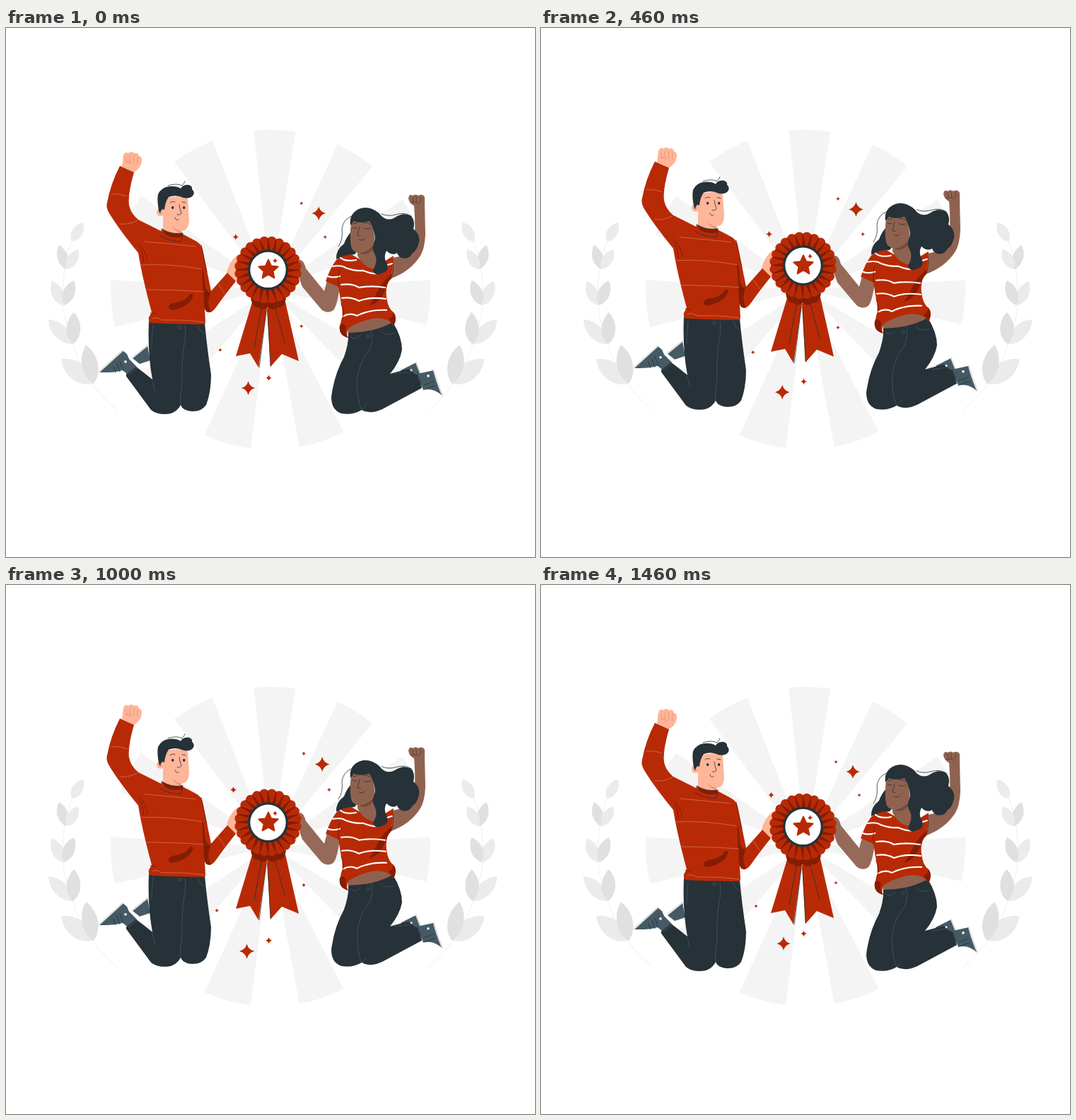
These frames come from a looping animation (748x748 px, 1500 ms). An HTML page:

```html
<!DOCTYPE html>
<html lang="en">
<head>
<meta charset="utf-8">
<title>Award jump</title>
<style>
html, body { margin: 0; width: 100%; height: 100%; overflow: hidden; background: #fff; }
svg { display: block; width: 100%; height: 100%; }
.red { fill: #b82a06; } .deep { fill: #851d04; } .navy { fill: #263238; } .shoe { fill: #455a64; }
.skin { fill: #ffb598; } .brown { fill: #8f6250; } .tan { fill: #966a58; }
.line { fill: none; stroke-width: .8; stroke-linecap: round; stroke-linejoin: round; }
.ink { stroke: #263238; } .seam { stroke: #46575f; } .thread { stroke: #d97b5f; stroke-width: .7; }
.wave { stroke: #fff; stroke-width: 2.1; } .sole { stroke: #dfe1e2; stroke-width: 2.2; }
</style>
</head>
<body>
<svg viewBox="0 0 748 748">
  <defs>
    <g id="laurel">
      <path class="line" stroke="#ebebeb" d="M158 541Q108 499 94 445Q78 405 80 372Q82 326 94 300"/>
    </g>
  </defs>
  <path id="rays" fill="#f4f4f4"/>
  <use href="#laurel"/>
  <use href="#laurel" transform="matrix(-1 0 0 1 754.5 0)"/>

  <g id="jump">
    <g id="man">
      <path class="shoe" d="M179 467L200 449L204 470L189 475Z"/>
      <path class="line sole" d="M179 466L200 449"/>
      <path class="shoe" d="M132 487L165 456L171 461L174 468L185 479L171 489L165 484Q150 488 132 487Z"/>
      <path class="line sole" d="M132 486L165 456"/>
      <path class="line ink" d="M157 474L161 486M161 471L166 484M152 479L155 487"/>
      <circle cx="169" cy="472" r="1.8" fill="#fff"/>
      <path class="navy" d="M202 415L281 417Q284 450 290 490Q290 515 283 533Q276 543 262 542Q250 541 247 533Q240 546 225 546Q212 546 205 540L171 494Q168 490 172 488L184 479Q196 488 207 497Q200 460 202 415Z"/>
      <path class="line seam" d="M247 533Q246 525 247 518M253 421Q255 437 252 447Q248 470 249 500L247 519M207 500L211 514M208 420Q206 440 206 452M272 421Q274 430 280 432M173 490L186 481"/>
      <circle class="line seam" cx="245" cy="423" r="2.2"/>

      <path class="skin" d="M312 346Q315 331 328 320L335 350L325 358Z"/>
      <path class="skin" d="M164 196L166 180Q168 174 173 177Q177 173 181 177Q187 175 188 181Q193 182 192 188Q191 198 181 204Z"/>
      <path class="line" stroke="#e88d70" d="M171 181Q168 185 172 190M176 180Q173 185 176 191M181 180Q179 185 181 191M187 182Q184 187 186 192M169 190Q175 188 178 193"/>
      <path class="red" d="M161 195L181 204Q172 235 174 250Q176 262 187 271L219 287Q232 296 249 291L268 301Q276 305 278 313L290 372L313 346L325 358Q308 379 297 395Q290 405 283 401L281 397L282 416Q282 419 279 419Q240 419 205 417Q201 416 202 409L206 402Q192 350 187 318Q160 285 146 262Q141 254 143 247Q148 220 161 195Z"/>
      <path class="deep" d="M277 338C284 352 276 366 289 376Q283 388 290 402Q281 402 280 392ZM230 394C234 384 247 394 260 377C267 372 265 384 258 389C248 398 228 403 230 394Z"/>
      <path class="line thread" d="M149 235Q161 234 171 238M161 277Q172 279 186 272M196 302Q230 305 268 309M191 335Q232 333 277 341M199 370Q240 370 280 373M207 411Q214 408 220 413Q250 412 281 416M300 362L309 375"/>
      <path class="line" stroke="#701704" d="M187 305Q198 314 200 330M189 310Q195 322 194 332M276 307L284 345M290 372L281 380M204 403Q207 405 211 404"/>

      <path class="skin" d="M221 242Q240 236 257 240L259 272Q258 287 248 287L249 291Q235 296 222 285L222 265Q214 268 213 261Q213 254 221 256Z"/>
      <path fill="#ed9478" d="M235 279Q240 286 248 287L248 290Q238 288 235 279Z"/>
      <path class="red" d="M220 284Q234 293 250 290L248 302Q231 302 218 294Z"/>
      <path class="deep" d="M222 285Q235 293 250 290L249 295Q236 299 224 291Z"/>
      <path class="line ink" d="M220 284Q234 293 250 290L248 302Q231 302 218 294"/>
      <path class="navy" d="M217 262Q213 246 215 235Q220 225 231 224Q241 223 247 227Q250 221 259 222Q264 224 263 228Q267 231 265 236Q261 242 251 240Q240 235 230 239Q225 246 224 257L221 256Z"/>
      <path class="line ink" d="M229 223Q241 219 249 223Q252 220 253 217M232 247Q235 244 239 246M249 246L254 247M245 250Q246 257 248 262Q246 265 242 264M239 268Q240 273 244 271M217 259L219 262"/>
      <path class="navy" d="M234 254a1.7 2 0 1 0 3.4 0a1.7 2 0 1 0-3.4 0M250 254a1.7 2 0 1 0 3.4 0a1.7 2 0 1 0-3.4 0"/>
    </g>

    <g id="woman">
      <path class="navy" d="M488 288Q481 296 478 305Q466 314 467 327Q478 322 493 320L510 300Z"/>
      <path class="brown" d="M577 251L592 249L593 292Q592 312 586 322Q572 344 545 354L547 325Q566 322 576 310Q580 290 577 251Z"/>
      <path class="brown" d="M569 241Q570 234 575 237Q579 234 583 237Q589 234 592 239L592 252L578 252Q570 248 569 241Z"/>
      <path class="line" stroke="#59392e" d="M575 239L576 246M580 239L581 246M586 239L586 246M572 247Q579 245 584 248"/>
      <path class="tan" d="M413 329Q420 325 424 340L450 372L454 357L472 364Q469 391 463 399Q455 405 446 398L419 366Q411 347 413 329Z"/>

      <path class="shoe" d="M558 484L580 473L586 490L570 497Z"/>
      <path class="line sole" d="M580 473L586 488"/>
      <circle cx="573" cy="484" r="1.6" fill="#fff"/>
      <path class="navy" d="M543 489L569 482L584 494L550 510Z"/>
      <path class="line seam" d="M546 490L575 486"/>
      <path class="shoe" d="M582 489L605 484Q609 498 617 520Q604 508 590 512Z"/>
      <path class="line sole" d="M605 484Q609 500 617 519"/>
      <path class="line ink" d="M591 505L604 500M594 510L606 506"/>
      <circle cx="597" cy="492" r="1.8" fill="#fff"/>
      <path class="brown" d="M483 422Q510 408 546 406L550 418Q520 433 484 436Z"/>
      <path class="navy" d="M484 431Q520 431 547 416Q560 437 560 455Q557 472 543 489L582 490Q587 498 588 509L532 539Q515 547 503 540Q490 548 474 545Q460 540 460 522Q464 490 478 465Q485 445 484 431Z"/>
      <path class="line seam" d="M516 428Q520 443 514 455Q493 480 497 515Q498 530 503 540M503 540Q507 536 510 533M530 428Q535 436 549 432M487 436Q494 443 501 434M583 492L587 507"/>
      <circle class="line seam" cx="512" cy="436" r="2"/>

      <path class="red" d="M467 328Q476 321 488 320Q505 330 522 338L548 322L545 354Q536 362 538 380Q540 397 548 402Q554 410 548 421Q540 408 518 411Q500 415 485 424Q480 432 484 438Q470 435 472 421Q478 405 474 390L470 366L452 358Q459 338 467 328Z"/>
      <path class="deep" d="M472 421Q476 415 481 423Q478 432 484 438Q470 435 472 421ZM548 402Q554 410 548 421L541 411Q546 410 548 402ZM513 393C523 383 525 363 546 347L544 355C533 365 538 386 513 393Z"/>
      <path class="line wave" d="M473 325Q480 331 495 328M462 337Q474 335 480 339Q493 344 505 343Q520 349 527 347M455 351Q462 354 472 351M474 363Q490 361 499 367Q516 364 536 367M475 382Q488 380 499 386Q515 380 537 383M476 408Q487 402 496 407Q514 398 538 399M533 337L546 333"/>
      <path class="line" stroke="#701704" d="M470 366Q469 350 472 342M474 390Q481 405 474 415M545 354Q549 340 547 330"/>

      <path class="brown" d="M498 300L530 302L532 334L522 341Q507 340 497 322Z"/>
      <path fill="#75493b" d="M501 316Q513 315 519 308L519 313Q511 322 501 319Z"/>
      <path class="brown" d="M488 275Q485 300 489 312Q496 321 508 316Q518 312 521 300L520 270L495 268Z"/>
      <path class="navy" d="M487 279Q485 266 494 259Q505 251 518 256Q527 260 531 266Q540 274 550 268Q562 260 573 266Q579 273 576 284Q586 292 584 303Q581 315 575 318Q570 328 559 325Q554 322 553 318Q546 323 538 315Q534 322 537 330Q543 341 536 345L526 349Q520 348 519 342Q526 331 522 321Q516 313 521 302Q524 291 514 273Q500 277 492 273Z"/>
      <path class="line ink" d="M489 266Q477 270 475 284Q477 299 470 309M531 263Q541 267 551 264Q564 260 573 266M490 282Q493 284 496 283M506 283Q511 286 516 283M491 277L496 276M506 276Q511 274 515 278M500 281Q498 288 497 293L501 294M499 299Q503 302 507 298"/>
    </g>

    <g id="medal" class="red">
      <path d="M348 388L325 464L345 460L357 480L369 396ZM369 396L374 479L390 461L414 471L395 387Z"/>
      <path class="line ink" d="M361 398L351 452M358 480L368 400M370 400L374 478M381 397L394 445"/>
      <path class="deep" d="M346 381Q348 396 357 395Q363 401 370 395Q378 401 384 395Q394 396 396 381Z"/>
      <path id="rosette"/>
      <path id="folds" class="deep" stroke="#701704" stroke-width=".6"/>
      <circle class="navy" cx="370.5" cy="342" r="28.5"/>
      <circle cx="370.5" cy="342" r="25.2" fill="#fff"/>
      <path id="star" stroke="#b82a06" stroke-width="2" stroke-linejoin="round"/>
    </g>
  </g>
  <g id="sparks" class="red"></g>
</svg>
<script>
const $ = id => document.getElementById(id);
const rad = Math.PI / 180;
const polar = (x, y, r, deg) => `${(x + r * Math.cos(deg * rad)).toFixed(2)} ${(y + r * Math.sin(deg * rad)).toFixed(2)}`;
const repeat = (n, f) => Array.from({ length: n }, (_, i) => f(i)).join('');

function addPath(parent, d, fill) {
  const path = document.createElementNS('http://www.w3.org/2000/svg', 'path');
  path.setAttribute('d', d);
  if (fill) path.setAttribute('fill', fill);
  parent.append(path);
}

// Sunburst: start and end angle of each ray
const rays = [[-193.5, -176.5], [-160, -144], [-127, -111.3], [-96, -81], [-65.2, -50.4], [-34.4, -20],
  [-3.5, 12.5], [31, 46], [62.8, 79.6], [97.1, 114.4], [131, 147]];
$('rays').setAttribute('d', rays.map(([a, b]) =>
  `M374 370L${polar(374, 370, 226, a)}A226 226 0 0 1 ${polar(374, 370, 226, b)}Z`).join(''));

// Laurel leaves: base, tip, half width, shade
function leaf(x, y, tipX, tipY, w, fill) {
  const dx = tipX - x, dy = tipY - y, len = Math.hypot(dx, dy);
  const at = (f, side) => `${x + dx * f - dy / len * w * side} ${y + dy * f + dx / len * w * side}`;
  addPath($('laurel'), `M${x} ${y}C${at(.25, 1)} ${at(.7, 1)} ${tipX} ${tipY}C${at(.7, -1)} ${at(.25, -1)} ${x} ${y}`, fill);
}
const light = '#ebebeb', dark = '#e0e0e0';
leaf(123, 503, 78, 468, 17, light);
leaf(124, 503, 113, 448, 15, dark);
leaf(94, 447, 60, 412, 13, light);
leaf(95, 447, 96, 402, 13, dark);
leaf(80, 392, 65, 358, 11, light);
leaf(82, 392, 96, 357, 11, dark);
leaf(85, 341, 75, 307, 10, dark);
leaf(86, 341, 102, 313, 10, light);
leaf(93, 302, 109, 275, 10, light);

// Pleated rosette with its star
const onMedal = (r, deg) => polar(370.5, 342, r, deg);
const pleats = 24, step = 360 / pleats;
$('rosette').setAttribute('d', 'M' + onMedal(45, 0) +
  repeat(pleats, i => `Q${onMedal(50.5, (i + .5) * step)} ${onMedal(45, (i + 1) * step)}`) + 'Z');
$('folds').setAttribute('d', repeat(pleats, i =>
  `M${onMedal(27, i * step - 2)}L${onMedal(27, i * step + 7)}L${onMedal(44, i * step)}Z`));
$('star').setAttribute('d', 'M' + repeat(10, i =>
  (i ? 'L' : '') + polar(371, 342, i % 2 ? 6.8 : 14.3, i * 36 - 90)) + 'Z');

function spark(parent, x, y, r) {
  const c = r * .2;
  addPath(parent, `M${x} ${y - r}Q${x + c} ${y - c} ${x + r} ${y}Q${x + c} ${y + c} ${x} ${y + r}` +
    `Q${x - c} ${y + c} ${x - r} ${y}Q${x - c} ${y - c} ${x} ${y - r}Z`);
}
spark($('medal'), 380.5, 329, 3.5);
[[441, 264, 9.7], [343, 507, 9.7], [371.5, 493, 4.2], [325.5, 297, 4.2],
  [417, 250, 2.6], [450, 297, 2.6], [417, 421, 2.6], [304, 454, 2.6]].forEach(s => spark($('sparks'), ...s));

// Jump once per 1500 ms; sparkles pulse every 300 ms
const wave = (t, peak, period) => (1 + Math.cos((t - peak) / period * 2 * Math.PI)) / 2;
const start = performance.now();
function draw() {
  const t = (performance.now() - start) % 1500;
  const ramp = Math.abs((t + 770) % 1500 - 750) / 750;
  const lift = 9.1 * (.7 * wave(t, 730, 1500) + .3 * ramp);
  const scale = 1 + .088 * wave(t, 108, 300);
  $('jump').setAttribute('transform', `translate(0 ${-lift})`);
  $('sparks').setAttribute('transform', `translate(371 383) scale(${scale}) translate(-371 -383)`);
  requestAnimationFrame(draw);
}
draw();
</script>
</body>
</html>
```
